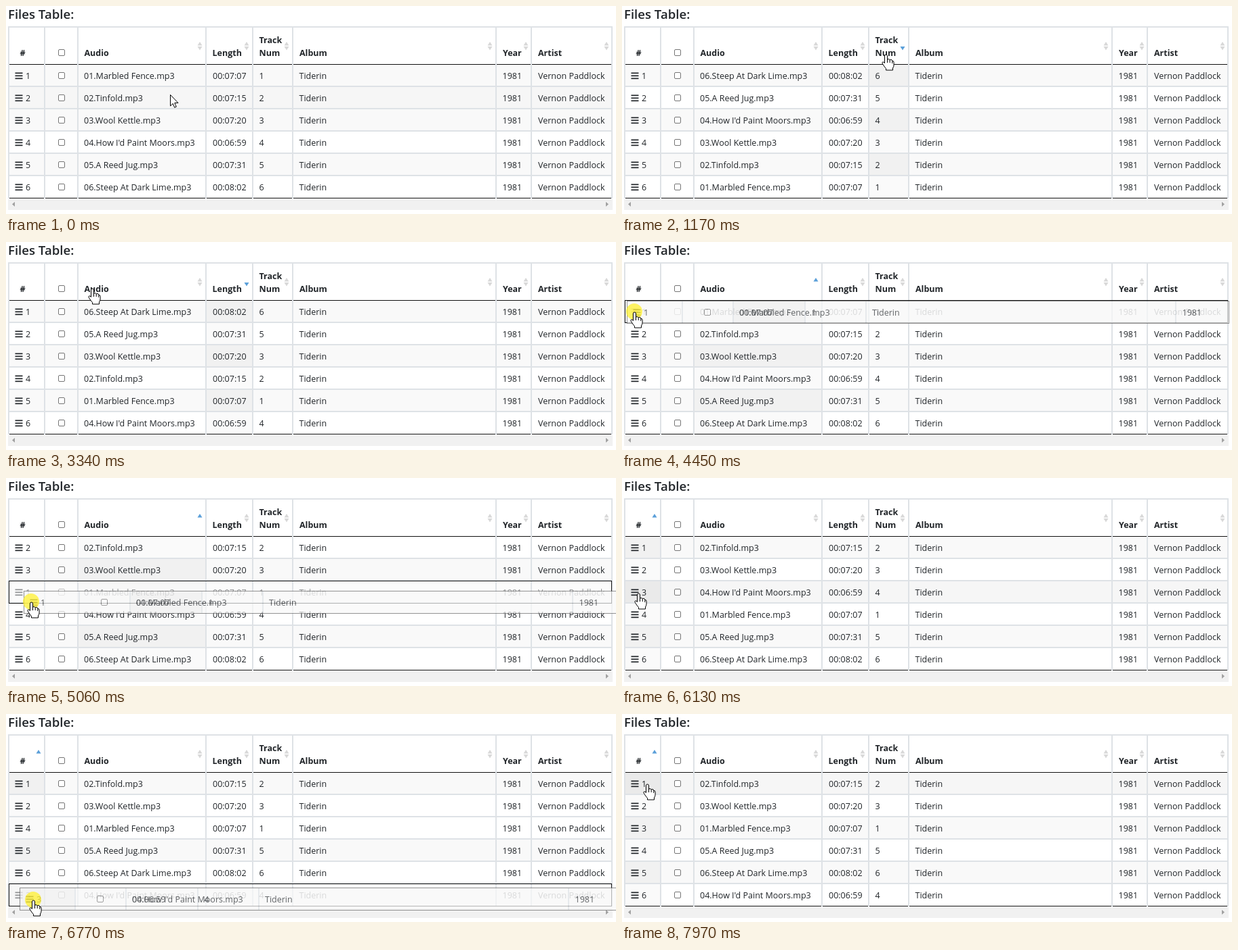
An HTML page that plays this animation: 900 px wide and 308 px high, repeating every 8000 ms.

```html
<!DOCTYPE html>
<html lang="en">
<head>
<meta charset="utf-8">
<title>Files Table</title>
<style>
html, body { margin: 0; width: 100%; height: 100%; overflow: hidden; background: #fff; }
svg { display: block; font: 12.5px "Open Sans", "Noto Sans", sans-serif; fill: #212529; }
text { white-space: pre; }
.title { font-size: 18.6px; font-weight: 600; }
.head { font-weight: 700; }
.box { fill: #fff; stroke: #767676; }
.cursor { fill: #fff; stroke: #000; stroke-linejoin: round; }
</style>
</head>
<body>
<svg width="900" height="308" viewBox="0 0 900 308">
  <text class="title" x="3" y="19">Files Table:</text>
  <g id="rows"></g>
  <g id="grid"></g>
  <g id="head"></g>
  <g id="bar">
    <path fill="#f1f1f1" d="M3 286H895V302H3Z"/>
    <path fill="#a0a0a0" d="M13 290V297L9 293.500ZM885 290V297L889 293.500Z"/>
  </g>
  <g id="slot"></g>
  <g id="ghost" opacity=".7"></g>
  <circle id="ring" r="12" fill="#fff028" fill-opacity=".72"/>
  <g id="hand" class="cursor">
    <path d="M-2 2Q-2 0 0 0Q2 0 2 2V8Q2 6.500 3.800 6.500Q5.500 6.500 5.700 8.500Q6 7.200 7.500 7.400Q9.200 7.600 9.300 9.500Q11.500 9 11.600 11.500V15Q11.600 18 10 20V23H0V20.500Q-2 18.500-4.500 14.500Q-6.500 12-5 11Q-3.800 10-2 12.500Z"/>
    <path fill="none" d="M2 7.500V12M5.700 8.500V12M9.300 9.500V13"/>
  </g>
  <path id="arrow" class="cursor" d="M0 0V16.500L3.800 13L6.200 18.800L8.800 17.700L6.300 12H11.500Z"/>
</svg>
<script>
const LOOP = 8000, TOP = 86, ROW = 33, LEFT = 4, RIGHT = 894;
const EDGES = [4, 57, 106, 295, 364, 423, 723, 775, 894];
const ALBUM = 'Tiderin', YEAR = '1981', ARTIST = 'Vernon Paddlock';

const tracks = [
  ['Marbled Fence', '00:07:07'],
  ['Tinfold', '00:07:15'],
  ['Wool Kettle', '00:07:20'],
  ["How I'd Paint Moors", '00:06:59'],
  ['A Reed Jug', '00:07:31'],
  ['Steep At Dark Lime', '00:08:02']
].map(([name, length], i) => [`0${i + 1}.${name}.mp3`, length, i + 1, ALBUM, YEAR, ARTIST]);

// column index, label lines, text x, sort icon x
const heads = [
  [0, ['#'], 20.5, 48],
  [2, ['Audio'], 115.5, 286],
  [3, ['Length'], 304.5, 355],
  [4, ['Track', 'Num'], 373.5, 414],
  [5, ['Album'], 433, 714],
  [6, ['Year'], 733, 767],
  [7, ['Artist'], 785, 886]
];

// start, sorted column, direction, order of tracks
const states = [
  [0, -1, '', '012345'],
  [750, 4, 'asc', '012345'],
  [1170, 4, 'desc', '543210'],
  [2650, 3, 'asc', '301245'],
  [2960, 3, 'desc', '542103'],
  [3470, 2, 'asc', '012345'],
  [5520, 0, 'asc', '123045'],
  [7100, 0, 'asc', '120453']
];

const drags = [
  { from: 4320, drop: 5470, redraw: 5520, src: 0, x: 16, y: 103 },
  { from: 6210, drop: 7050, redraw: 7100, src: 2, x: 25, y: 171 }
];

const clicks = [[660, 750], [1070, 1170], [2550, 2650], [2880, 2960], [3380, 3470]];

// time, x, y of the pointer's hot spot
const path = [
  [0, 243, 131], [40, 243, 131], [520, 390, 72], [1350, 390, 72], [1750, 624, 70],
  [2140, 379, 67], [2190, 379, 67], [2370, 325, 67], [3110, 325, 67], [3330, 128, 69],
  [3750, 128, 69], [4090, 16, 103], [4360, 16, 103], [4450, 19, 104], [5060, 38, 184],
  [5110, 38, 184], [5240, 38, 210], [5750, 38, 210], [6100, 25, 171], [6210, 25, 171],
  [6540, 37, 249], [6770, 41, 276], [7120, 41, 276], [7820, 41, 109], [7970, 38, 104],
  [8000, 38, 104]
];

// offsets inside a row: checkbox, then the text cells
const inPlace = { check: 78, cells: [111, 301, 369.5, 428.5, 728.5, 781] };
const lifted = { check: 119, cells: [166, 166, 272.5, 362, 819.5] };
const liftedEdges = [82, 157, 263, 353, 810], LIFTED_W = 889;

const $ = id => document.getElementById(id);
const rect = (x, y, w, h, fill) => `<rect x="${x}" y="${y}" width="${w}" height="${h}" fill="${fill}"/>`;
const text = (x, y, s, cls = '') => `<text class="${cls}" x="${x}" y="${y}">${s}</text>`;
const checkbox = (x, y) => `<rect class="box" x="${x - 4.5}" y="${y - 4.5}" width="9" height="9" rx="1.5"/>`;
const vline = (x, y, h) => rect(x - 1, y, 2, h, '#dee2e6');
const outline = (x, y, w, color) =>
  `<rect x="${x + .5}" y="${y + .5}" width="${w - 1}" height="${ROW}" fill="none" stroke="${color}"/>`;

function content(track, num, layout) {
  let out = [12.5, 16.5, 20.5].map(y => rect(9.5, y, 11, 1.7, '#212529')).join('');
  out += text(25, 22, num) + checkbox(layout.check, 17);
  layout.cells.forEach((x, i) => out += text(x, 22, tracks[track][i]));
  return out;
}

function shades(num, hover) {
  const odd = num % 2;
  if (hover) return ['#f6f6f6', odd ? '#eaeaea' : '#ececec'];
  return odd ? ['#f9f9f9', '#f1f1f1'] : ['#ffffff', '#fafafa'];
}

function drawHead(sorted, dir) {
  let out = checkbox(82, 69);
  for (const [col, lines, x, iconX] of heads) {
    lines.forEach((s, i) => out += text(x, 74 - 19 * (lines.length - 1 - i), s, 'head'));
    const up = `M${iconX - 3.5} 58.5L${iconX} 53L${iconX + 3.5} 58.5Z`;
    const down = `M${iconX - 3.5} 60L${iconX} 65.5L${iconX + 3.5} 60Z`;
    if (col === sorted) out += `<path fill="#5a9fd9" d="${dir === 'asc' ? up : down}"/>`;
    else if (col) out += `<path fill="#d8d8d8" d="${up + down}"/>`;
  }
  $('head').innerHTML = out;
}

function drawRows(items, sorted, hover, slot) {
  $('rows').innerHTML = items.map(({ track, num }, i) => {
    const [base, strong] = shades(num, i === hover);
    let out = rect(0, 0, RIGHT - LEFT, ROW, base);
    if (sorted >= 0) {
      const x = EDGES[sorted];
      out += rect(x - LEFT, 0, EDGES[sorted + 1] - x, ROW, strong);
    }
    out += content(track, num, inPlace);
    const fade = i === slot ? ' opacity=".5"' : '';
    return `<g transform="translate(${LEFT} ${TOP + i * ROW})"${fade}>${out}</g>`;
  }).join('');
  $('slot').innerHTML = slot < 0 ? '' : outline(LEFT, TOP + slot * ROW, RIGHT - LEFT, '#111');
}

function drawGhost({ track, num }, sorted) {
  const [base, strong] = shades(num, false);
  const at = sorted ? 157 : 0, width = sorted ? 106 : 82;
  $('ghost').innerHTML = rect(0, 0, LIFTED_W, ROW, base) + rect(at, 0, width, ROW, strong) +
    liftedEdges.map(x => vline(x, 1, ROW - 1)).join('') +
    outline(0, 0, LIFTED_W, '#666') + content(track, num, lifted);
}

function drawGrid() {
  let out = rect(3, 30, 892, 2, '#dee2e6');
  for (let i = 1; i < 6; i++) out += rect(3, TOP + i * ROW - 1, 892, 2, '#dee2e6');
  out += rect(LEFT, TOP, RIGHT - LEFT, 1, '#111') + rect(LEFT, 284, RIGHT - LEFT, 1, '#111');
  for (const x of EDGES) out += vline(x, 30, 255);
  $('grid').innerHTML = out;
}

function pointer(t) {
  const i = path.findIndex(p => p[0] > t);
  const [t0, x0, y0] = path[i - 1], [t1, x1, y1] = path[i];
  const k = (t - t0) / (t1 - t0), e = k * k * (3 - 2 * k);
  return [x0 + (x1 - x0) * e, y0 + (y1 - y0) * e];
}

const show = (id, on) => $(id).setAttribute('visibility', on ? 'visible' : 'hidden');
const move = (id, x, y) => $(id).setAttribute('transform', `translate(${x} ${y})`);

let lastKey = '';

function render(t) {
  const [x, y] = pointer(t);
  const [start, sorted, dir, order] = states.filter(s => s[0] <= t).pop();
  const drag = drags.find(d => t >= d.from && t < d.redraw);
  const held = !!drag && t < drag.drop;
  const under = Math.min(5, Math.floor((y - TOP) / ROW));
  const slot = held ? under : -1;
  const hover = drag || under < 0 ? -1 : under;

  const key = [start, !!drag, slot, hover].join();
  if (key !== lastKey) {
    lastKey = key;
    const items = [...order].map((c, i) => ({ track: +c, num: i + 1 }));
    if (drag) {
      const [item] = items.splice(drag.src, 1);
      items.splice(under, 0, item);
      drawGhost(item, sorted);
    }
    drawHead(sorted, dir);
    drawRows(items, sorted, hover, slot);
  }

  show('ghost', held);
  if (held) move('ghost', Math.round(LEFT + x - drag.x), Math.round(TOP + drag.src * ROW + y - drag.y));

  const px = Math.round(x), py = Math.round(y);
  const link = x < 57 || (y < TOP && x >= 106);
  show('ring', held || clicks.some(([a, b]) => t >= a && t < b));
  show('hand', link);
  show('arrow', !link);
  move('ring', px - 1, py - 1);
  move('hand', px - .5, py);
  move('arrow', px - .5, py + .5);
}

drawGrid();
const origin = performance.now();
function tick() {
  render((performance.now() - origin) % LOOP);
  requestAnimationFrame(tick);
}
tick();
</script>
</body>
</html>
```
